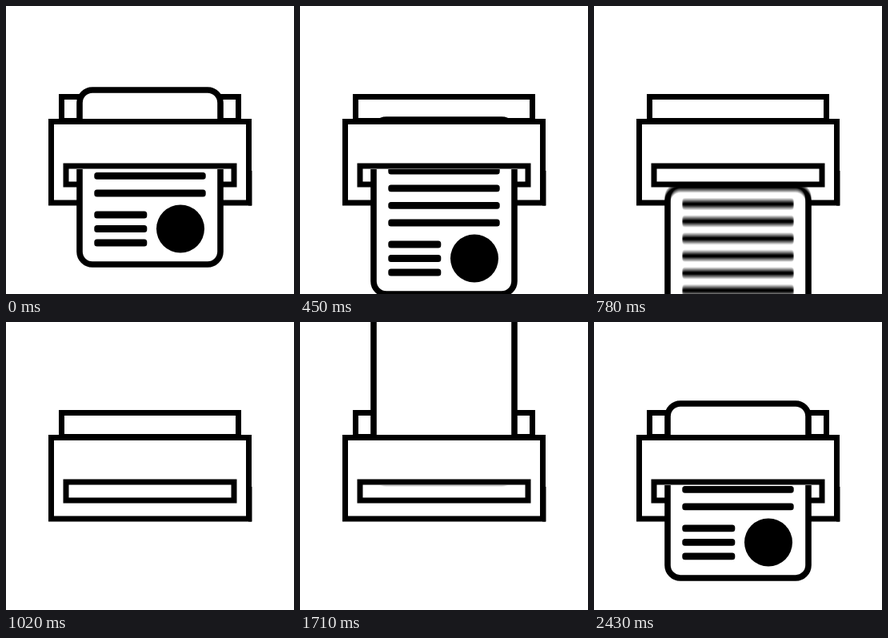
Recreate the animation shown at these times as an HTML page with a canvas. Size 360 by 360 pixels, loop 2.46 s.

```html
<!DOCTYPE html>
<html lang="en">
<head>
<meta charset="utf-8">
<title>Printer</title>
<style>
html, body { margin: 0; width: 100%; height: 100%; overflow: hidden; background: #fff; }
canvas { display: block; width: 360px; height: 360px; }
</style>
</head>
<body>
<canvas id="stage" width="360" height="360"></canvas>
<script>
const stage = document.getElementById('stage').getContext('2d');
const buffer = document.createElement('canvas');
buffer.width = buffer.height = 360;
const ctx = buffer.getContext('2d');

const LOOP = 2460, STEP = 30, SAMPLES = 10;
const SLOT_Y = 204;

// Paper offset over time: [ms, px, px per ms]
const KEYS = [
  [0, 0, 0.06],
  [450, 37, 0.1],
  [780, 121.5, 0.45],
  [1010, 262, 0.68],
  [1011, 400, 0],
  [1339, 400, 0],
  [1340, -327, 0.65],
  [1710, -124, 0.42],
  [1970, -76.5, 0.01],
  [2160, -70, 0.13],
  [LOOP, 0, 0.06]
];

// Cubic Hermite interpolation: returns [position, speed]
function motion(t) {
  const i = KEYS.findIndex(k => t < k[0]);
  const [t0, p0, v0] = KEYS[i - 1], [t1, p1, v1] = KEYS[i];
  const d = t1 - t0, u = (t - t0) / d;
  const a = 2 * (p0 - p1) + d * (v0 + v1);
  const b = 3 * (p1 - p0) - d * (2 * v0 + v1);
  return [((a * u + b) * u + d * v0) * u + p0, ((3 * a * u + 2 * b) * u) / d + v0];
}

function box(x, y, w, h) {
  ctx.lineWidth = 7;
  ctx.fillStyle = '#fff';
  ctx.fillRect(x, y, w, h);
  ctx.strokeRect(x, y, w, h);
}

function bar(y, w) {
  ctx.beginPath();
  ctx.roundRect(110.3, y - 4.4, w, 8.8, 3.5);
  ctx.fill();
}

function sheet(dy, top, bottom, printed) {
  ctx.save();
  ctx.beginPath();
  ctx.rect(0, top, 360, bottom - top);
  ctx.clip();
  ctx.translate(0, dy);
  ctx.lineWidth = 7.6;
  ctx.fillStyle = '#fff';
  ctx.beginPath();
  ctx.roundRect(92, 105, 176, 218, 16);
  ctx.fill();
  ctx.stroke();
  if (printed) {
    ctx.fillStyle = '#000';
    for (let i = 0; i < 6; i++) bar(126 + 21.6 * i, 139.4);
    for (let i = 0; i < 3; i++) bar(261 + 17.5 * i, 66);
    ctx.beginPath();
    ctx.arc(218, 278.5, 30, 0, 2 * Math.PI);
    ctx.fill();
  }
  ctx.restore();
}

function scene(dy) {
  ctx.fillStyle = '#fff';
  ctx.fillRect(0, 0, 360, 360);
  ctx.strokeStyle = '#000';
  box(69.5, 113.5, 221, 30);
  sheet(dy, 0, 144, false);
  box(56.5, 144.5, 247, 101.5);
  ctx.fillStyle = '#000';
  ctx.fillRect(303, 206, 4.5, 43.5);
  box(75, 200, 210, 23);
  sheet(dy, SLOT_Y, 360, true);
}

function draw(now) {
  const t = Math.floor((now % LOOP) / STEP) * STEP;
  const [y, speed] = motion(t);
  // Fast movement is smeared by averaging whole shifted pictures
  const blur = speed > 0.2 ? speed * 15 : 0;
  const count = blur ? SAMPLES : 1;
  for (let i = 0; i < count; i++) {
    scene(y + blur * ((i + 0.5) / count - 0.5));
    stage.globalAlpha = 1 / (i + 1);
    stage.drawImage(buffer, 0, 0);
  }
}

let start;
function tick(now) {
  start ??= now;
  draw(now - start);
  requestAnimationFrame(tick);
}
requestAnimationFrame(tick);
</script>
</body>
</html>
```
